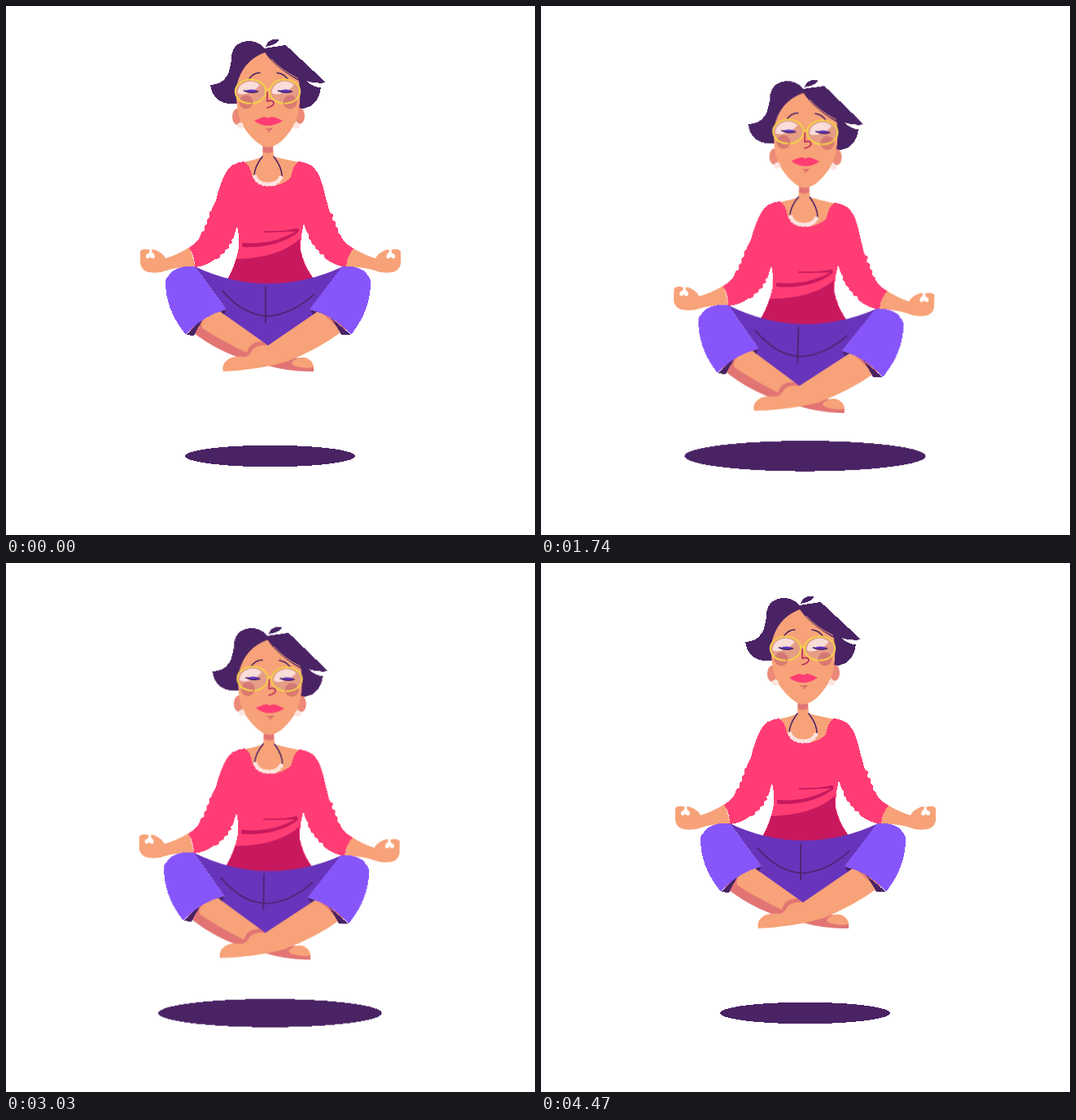
Write an HTML page without scripts that moves like this. It is 650 px wide and 650 px high and loops after 4.5 s.

```html
<!DOCTYPE html>
<html lang="en">
<head>
<meta charset="utf-8">
<title>Floating meditation</title>
<style>
  html, body { margin: 0; height: 100%; overflow: hidden; background: #fff; }
  svg { display: block; width: 100vw; height: 100vh; }

  .skin { fill: #f7a278; }
  .shade { fill: #e27574; }
  .hair { fill: #4a2364; }
  .shirt { fill: #ff3d74; }
  .wine { fill: #c8195e; }
  .knee { fill: #8756fb; }
  .pants { fill: #6834bb; }
  .pearl { fill: #fde4df; }
  .white { fill: #fff; }
  .hard { shape-rendering: crispEdges; }
  .line { fill: none; stroke: #4a2364; stroke-width: 1.6; stroke-linecap: round; }
  .red { stroke: #b6265c; }

  .body, .shadow { animation: 4.5s linear infinite; }
  .body { transform-origin: 325px 238px; animation-name: float; }
  .shadow { transform-origin: 324.5px 553px; animation-name: spread; }
  @keyframes float {
    0%, 99.333%, 100% { transform: translateY(0) rotate(0deg); }
    47.333% { transform: translateY(61px) rotate(1.74deg); }
  }
  @keyframes spread {
    0%, 99.333%, 100% { transform: scale(1); }
    47.333% { transform: scale(1.512); }
  }
</style>
</head>
<body>
<svg viewBox="0 0 650 650">
  <defs>
    <g id="hand">
      <path class="skin" d="M226 296Q210 306 196 310Q193 304 186 301Q182 298 178 300L174 299Q168 298 165 301V317Q167 325 175 327Q188 329 197 325Q214 320 233 321Z"/>
      <path class="white" d="M172 309Q171 305 175 304Q177 303 176 299H179Q179 303 181 304Q184 307 182 310Q179 311 177 308Q175 312 172 309Z"/>
    </g>
    <g id="lens">
      <ellipse rx="18.5" ry="14.5" fill="#dc9a90" opacity=".6"/>
      <path d="M-16 2Q-15-11 0-12.500Q8-12 11-8Q6-1-3 2Q-11 5-16 2Z" fill="#fdeeee" opacity=".8"/>
      <path d="M-7-1Q1-4 9-1Q3 5-7-1Z" fill="#6337c0"/>
      <path class="line" d="M-8-1Q0 3 9 0"/>
      <ellipse rx="18.700" ry="14.700" fill="none" stroke="#f3cf4c" stroke-width="2"/>
    </g>
  </defs>

  <ellipse class="shadow hair hard" cx="324.5" cy="553" rx="104.5" ry="13.2"/>

  <g class="body">
    <use href="#hand"/>
    <use href="#hand" transform="matrix(-1 0 0 1 650 0)"/>

    <!-- legs -->
    <path class="shade" d="M226 398L250 372L275 365L322 414L340 433Q372 429 378 443V449Q350 450 318 441Q265 430 226 398Z"/>
    <path class="skin" d="M241 389Q246 379 266 368L320 413Q300 410 296 426Q268 413 243 397Q239 394 241 389Z"/>
    <path class="skin" d="M352 437Q358 431 368 432Q377 435 378 444Q366 446 354 442Q350 440 352 437Z"/>
    <path class="skin" d="M374 366L400 376L414 399Q385 421 345 437Q310 447 267 449Q264 441 273 434Q279 430 294 431Q300 429 303 422Q309 416 322 417Z"/>
    <path class="shade" d="M374 368L405 378L418 398L411 402Q404 387 374 368Z"/>
    <path class="hair hard" d="M221 404L231 405L242 384ZM424 404L412 404Q409 398 400 384Z"/>

    <!-- torso -->
    <path class="skin" d="M292 192Q310 188 315 185L316 171H328L329 185Q340 188 361 192L352 220H300Z"/>
    <path class="shade" d="M315.500 172H328V179Q322 182 315.500 179Z"/>
    <path class="shirt hard" d="M292 191Q276 193 270 205Q263 218 258 239Q254 246 253 250L250 254L250 259L247 262L247 267L244 270L244 276L240 278Q239 288 225 297Q232 307 232 321Q247 319 257 311L262 310L264 305L268 304L270 299L274 298L274 293L278 291L277 287L280 284Q282 276 284 270Q287 284 286 297Q283 316 271 338Q322 360 378 335Q366 318 362 300Q362 282 366 267Q369 279 372 281L372 286L375 288L376 293L379 294L381 299L384 300L386 305L390 305L392 310Q404 319 418 321Q419 307 427 298Q413 290 411 281L408 279L408 273L405 271L405 265L401 263L402 256L398 254Q394 240 389 220Q384 202 375 196Q369 192 360 191Q352 196 350 211Q338 222 322 221Q308 220 302 208Q300 195 292 191Z"/>
    <path class="wine" d="M283 311Q337 309 361 286Q360 313 378 335Q322 358 271 338Q280 323 283 311Z"/>
    <path class="wine" d="M291 291Q326 294 356 277L317 278.500V276.500Q344 277 357 273Q361 274 359 278Q333 298 291 296Q289 293 291 291Z"/>
    <path class="line" d="M315 185Q305 198 305 209M329 185Q339 198 339 209"/>
    <path d="M306 210Q310 219 322 219Q334 219 338 210" fill="none" stroke="#fde4df" stroke-width="5.500" stroke-linecap="round" stroke-dasharray="0 4.700"/>
    <path d="M306 211Q310 219 322 219Q334 219 338 211" fill="none" stroke="#fde4df" stroke-width="3.500"/>

    <!-- trousers -->
    <path class="pants" d="M232 320Q276 341 322 341Q370 341 414 320L373 373L382 376L322 417L264 376L271 373Z"/>
    <path class="hair" d="M271 372L262 374L268 379ZM373 372L384 374L377 379Z"/>
    <path class="knee hard" d="M232 320Q214 319 206 325Q199 331 196 337Q195 372 221 404Q242 380 271 373Z"/>
    <path class="knee hard" d="M413 320Q431 319 439 325Q446 331 448 337Q449 372 424 404Q403 380 373 373Z"/>
    <path class="line" d="M319 345V389M266 350Q292 380 321 381Q350 380 379 354"/>

    <!-- head -->
    <path class="hair hard" d="M251 97Q270 96 275 77Q277 70 277 61Q280 44 298 43Q310 43 318 52L343 48L348 52L393 94Q382 96 369 92Q377 100 387 100Q383 126 361 126L285 120Q255 123 251 97Z"/>
    <path class="hair hard" d="M319 50Q323 39 335 41Q335 47 319 50Z"/>
    <ellipse cx="284" cy="136" rx="6" ry="10" fill="#ed8978"/>
    <ellipse cx="361" cy="135" rx="6" ry="10" fill="#ed8978"/>
    <path class="skin" d="M318 57Q331 76 360 92Q364 120 356 143Q342 167 329 172Q322 175 315 172Q300 163 289 144Q282 126 283 100Q289 68 318 57Z"/>
    <path d="M326 65Q338 79 359 89" fill="none" stroke="#f7a278"/>
    <circle class="pearl" cx="288" cy="147" r="3.800"/>
    <circle class="pearl" cx="357" cy="147" r="3.800"/>
    <path class="line" d="M298 91Q303 82 312 82M333 82Q342 83 347 91"/>
    <use href="#lens" x="300.500" y="105"/>
    <use href="#lens" x="342.500" y="105"/>
    <g fill="#c9606c" opacity=".6">
      <circle cx="295" cy="118" r="8.500"/>
      <circle cx="349" cy="118" r="8.500"/>
    </g>
    <path d="M284 113Q290 120 301 119.700M342 119.700Q353 120 359 112M319 104Q321.500 101 324 104" fill="none" stroke="#f3cf4c" stroke-width="2"/>
    <path class="line red" d="M321 106L321 117Q328 115 329 119Q329 123 321 125"/>
    <path class="shirt" d="M305 141Q313 137 318 136L322 137.500L327 136Q333 137 340 141Q331 147 322 147Q313 147 305 141Z"/>
    <path d="M319 151Q322 152 326 151L322 155" fill="none" stroke="#d8616a" stroke-width="1.300"/>
  </g>
</svg>
</body>
</html>
```
